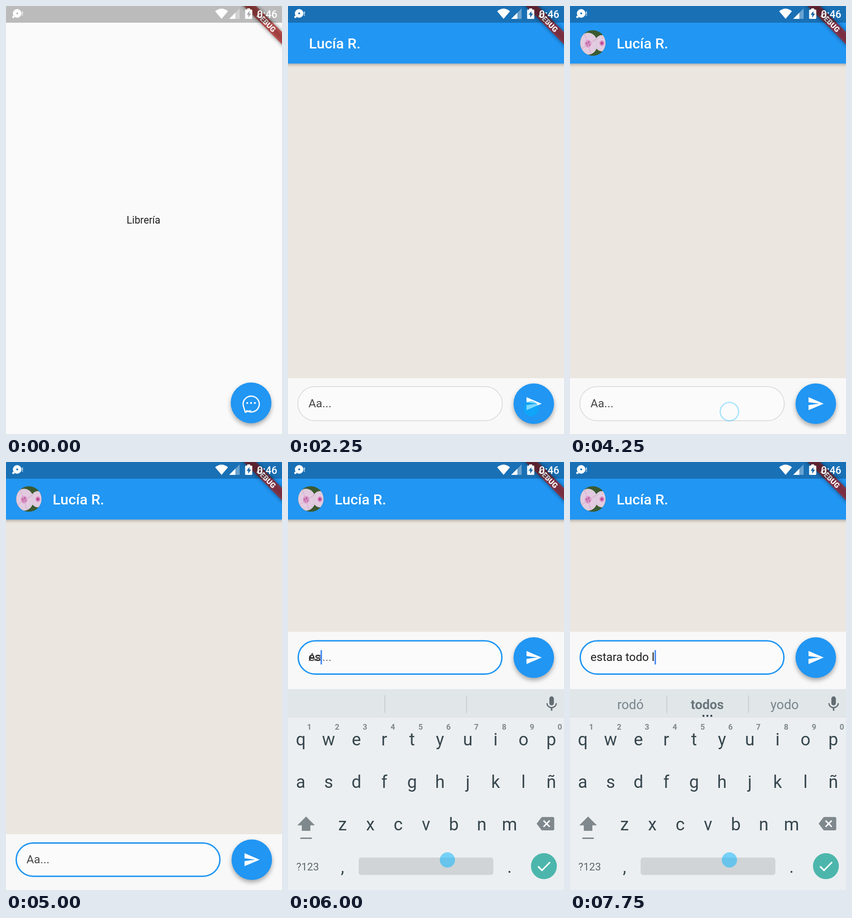
Write an HTML page that moves like this. It is 580x897 px and loops after 8 s.

```html
<!DOCTYPE html>
<html lang="es">
<head>
<meta charset="utf-8">
<title>Chat</title>
<style>
  html, body { margin: 0; width: 100%; height: 100%; overflow: hidden; background: #fafafa; }
  svg { display: block; width: 580px; height: 897px; }
  text { font-family: Roboto, sans-serif; white-space: pre; }
  .mid { text-anchor: middle; }
  .fab { fill: #2196f3; filter: drop-shadow(0 5px 5px rgba(0, 0, 0, .32)); }
  .bar { fill: #2196f3; filter: drop-shadow(0 2px 3px rgba(0, 0, 0, .32)); }
  .title { font-size: 30.4px; font-weight: 500; fill: #fff; }
  .field { font-size: 24.3px; fill: #212121; }
  .hint { fill: #484848; }
  .key { font-size: 36.5px; fill: #37474f; text-anchor: middle; }
  .digit { font-size: 16.5px; font-weight: 700; fill: #7f898e; text-anchor: middle; }
  .word { font-size: 27.4px; fill: #78858b; text-anchor: middle; }
  .best { font-weight: 700; fill: #6b787e; }
  .band { fill: #b71c1c; fill-opacity: .63; }
  .tag { font-size: 15.5px; font-weight: 900; fill: #fff; text-anchor: middle; }
  .clock { font-size: 21.6px; font-weight: 500; fill: #fff; }
</style>
</head>
<body>
<svg viewBox="0 0 580 897">
  <defs>
    <clipPath id="face"><circle cx="48" cy="77.5" r="26.7"/></clipPath>
    <radialGradient id="petal">
      <stop offset="0" stop-color="#a81c78"/>
      <stop offset=".16" stop-color="#c763a6"/>
      <stop offset=".4" stop-color="#e6cbe2"/>
      <stop offset="1" stop-color="#dccbdc"/>
    </radialGradient>
    <filter id="soft" x="-30%" y="-100%" width="160%" height="300%"><feGaussianBlur stdDeviation="4"/></filter>
  </defs>

  <rect width="580" height="897" fill="#fafafa"/>

  <g id="home">
    <text class="mid" x="289" y="456" font-size="21.25" fill="#212121">Librería</text>
    <circle class="fab" cx="515" cy="831.7" r="42.8"/>
    <path d="M505 847.5A17 16.6 0 1 0 498.6 837.5Q500.5 844 503 851.5Q510 848 515 848.6" fill="none" stroke="#fff" stroke-width="2.6" stroke-linejoin="round"/>
    <g fill="#fff">
      <circle cx="507" cy="832" r="2.1"/><circle cx="515" cy="832" r="2.1"/><circle cx="523" cy="832" r="2.1"/>
    </g>
  </g>

  <g id="chat">
    <rect id="wall" width="580" height="780" fill="#ebe6e0"/>
    <rect class="bar" x="-10" y="-10" width="600" height="130.5"/>
    <g id="avatar" clip-path="url(#face)">
      <rect x="20" y="50" width="56" height="56" fill="#3c5a30"/>
      <ellipse cx="67" cy="78" rx="15" ry="17" fill="url(#petal)"/>
      <ellipse cx="38" cy="79" rx="20" ry="23" fill="url(#petal)"/>
      <path d="M38 80L30 58M38 80L56 69M38 80L24 90M38 80L44 101" stroke="#d9aed2" stroke-width="1.5"/>
    </g>
    <text id="name" class="title" y="89">Lucía R.</text>

    <g id="dock">
      <rect y="780" width="580" height="120" fill="#f8f8f8"/>
      <rect id="box" rx="36" fill="#fbfbfb"/>
      <text id="hint" class="field hint" x="43" y="840.5">Aa...</text>
      <text id="typed" class="field" x="43" y="840.5"></text>
      <rect id="caret" y="818" width="3" height="30" fill="#4285f4"/>
      <circle class="fab" cx="516.5" cy="833.5" r="42.6"/>
      <path transform="translate(498.2 815.2) scale(1.518)" d="M2.01 21L23 12 2.01 3 2 10l15 2-15 2z" fill="#fff"/>
    </g>

    <g id="keyboard">
      <rect y="476" width="580" height="421" fill="#eceff1"/>
      <rect y="476" width="580" height="60" fill="#e1e6e9"/>
      <path d="M203.5 489v37M375 489v37" stroke="#c4c9cc" stroke-width="1.5"/>
      <path transform="translate(535 488) scale(1.58)" fill="#616c72" d="M12 14c1.66 0 3-1.34 3-3V5c0-1.66-1.34-3-3-3S9 3.34 9 5v6c0 1.66 1.34 3 3 3zm5.3-3c0 3-2.54 5.1-5.3 5.1S6.7 14 6.7 11H5c0 3.41 2.72 6.23 6 6.72V21h2v-3.28c3.28-.48 6-3.3 6-6.72z"/>
      <text class="word" x="127" y="518"></text>
      <text class="word best" x="288.5" y="518"></text>
      <text class="word" x="451" y="518"></text>
      <g id="more" fill="#37474f">
        <circle cx="280.5" cy="532" r="2.2"/><circle cx="288.7" cy="532" r="2.2"/><circle cx="297" cy="532" r="2.2"/>
      </g>
      <g id="keys"></g>
      <g fill="#7f898d">
        <path d="M38 743L56.5 761.5H47V773H29V761.5H19.5Z"/>
        <rect x="26" y="787" width="24" height="3"/>
        <path d="M522.5 758L532 745.5Q533 744 535 744H556.5Q559.5 744 559.5 747V769Q559.5 772 556.5 772H535Q533 772 532 770.5Z"/>
      </g>
      <path d="M537 751.5l13 13m0-13l-13 13" stroke="#fff" stroke-width="3"/>
      <text x="17.5" y="856" font-size="22" fill="#5c696f">?123</text>
      <text class="key" x="114.5" y="861">,</text>
      <text class="key" x="465.5" y="861">.</text>
      <rect x="148.5" y="829" width="283" height="36.5" rx="5" fill="#d0d4d6"/>
      <circle cx="537.8" cy="847" r="27.2" fill="#4db6ac"/>
      <path d="M525.5 847.5l8.3 8.3 17-17.3" fill="none" stroke="#fff" stroke-width="3.2"/>
    </g>
  </g>

  <g transform="translate(585.5 0) rotate(45)">
    <rect x="-70" y="42.5" width="140" height="18.3" opacity=".5" filter="url(#soft)"/>
    <rect class="band" x="-70" y="42.5" width="140" height="18.3"/>
    <text class="tag" x="-3" y="57.2">DEBUG</text>
  </g>

  <rect width="580" height="35" fill="#000" fill-opacity=".255"/>
  <g fill="#fff">
    <path d="M23.5 6.5a9 9 0 1 1-.1 0zm0 7a2 2 0 1 0 .1 0z" fill-rule="evenodd"/>
    <circle cx="15.5" cy="23" r="2.4"/>
    <path d="M33.5 11.5h2v6h-2zM33.5 18.5h2v2h-2z" opacity=".8"/>
    <path d="M439.5 11Q453 0 466.5 11L453 27Z"/>
    <path d="M469 27L491 5V27Z" opacity=".35"/>
    <path d="M469 27L482 14V27Z"/>
    <path fill-rule="evenodd" d="M507 5h6v2.5h3q1.5 0 1.5 1.5v16.500q0 1.500-1.500 1.500h-12q-1.500 0-1.500-1.500v-16.500q0-1.500 1.500-1.500h3zM511.500 10.500L505.500 18.500H509V24.500L515 16H511.500Z"/>
    <text class="clock" x="527.5" y="24.500">0:46</text>
  </g>

  <circle id="dot" r="16" fill="#00b4ff" fill-opacity=".5"/>
  <circle id="ring" fill="none" stroke="#00b4ff" stroke-width="2.6"/>
</svg>
<script>
  const LOOP = 8000;
  const $ = id => document.getElementById(id);
  const words = document.querySelectorAll('.word');

  const rows = [
    ['qwertyuiop', 26.8, 594],
    ['asdfghjklñ', 26.8, 683],
    ['zxcvbnm', 114.5, 772]
  ];
  const label = (cls, x, y, s) => `<text class="${cls}" x="${x}" y="${y}">${s}</text>`;
  $('keys').innerHTML = rows.map(([letters, x0, y], row) =>
    [...letters].map((c, i) => {
      const x = x0 + i * 58.5;
      return label('key', x, y, c) + (row ? '' : label('digit', x + 18, 561, (i + 1) % 10));
    }).join('')).join('');

  const start = {
    chat: false, avatar: false, raised: false, focus: 0, keys: 0,
    dot: null, ring: null, text: '', hint: 1, caret: false, words: ['', '', ''], more: false
  };

  // Each step changes part of the state; ring is [x, y, radius, opacity].
  const steps = [
    [500, { dot: [499, 878] }],
    [750, { dot: [511, 844] }],
    [1500, { dot: null, ring: [511, 860.5, 19.3, .35] }],
    [1750, { ring: [511, 861, 20.5, .15] }],
    [2000, { ring: null }],
    [2250, { chat: true, dot: [511, 844] }],
    [3000, { dot: [491, 849] }],
    [3250, { avatar: true, dot: [361, 845] }],
    [3500, { dot: [335, 834] }],
    [4250, { dot: null, ring: [335, 850, 19.3, .35] }],
    [4500, { ring: [335, 850.5, 20, .2] }],
    [4750, { ring: [335, 851, 20.6, .1], focus: .5 }],
    [5000, { ring: null, focus: 1 }],
    [5500, { raised: true, dot: [335, 834] }],
    [5750, { keys: .6 }],
    [6000, { keys: 1, text: 'es', hint: .8, caret: true }],
    [6250, { text: 'esta', hint: 0 }],
    [6500, { text: 'estara ', words: ['estaba', 'estará', 'estaré'] }],
    [6750, { words: ['estará', 'estara', 'estaré'], more: true }],
    [7000, { caret: false }],
    [7250, { text: 'estara to', caret: true }],
    [7500, { text: 'estara todo', words: ['todos', 'todo', 'toda'] }],
    [7750, { text: 'estara todo l', words: ['rodó', 'todos', 'yodo'] }]
  ];

  const set = (el, attrs) => { for (const k in attrs) el.setAttribute(k, attrs[k]); };
  const show = (el, on) => set(el, { visibility: on ? 'inherit' : 'hidden' });

  function drawBox(focus) {
    const w = 1.3 + 1.7 * focus;
    set($('box'), {
      x: 20 + w / 2, y: 797 + w / 2, width: 431 - w, height: 72.7 - w,
      'stroke-width': w, stroke: focus === 1 ? '#2196f3' : focus ? '#7ab3e3' : '#d0d0d0'
    });
  }

  function draw(s) {
    show($('home'), !s.chat);
    show($('chat'), s.chat);
    show($('avatar'), s.avatar);
    set($('name'), { x: s.avatar ? 98 : 44 });

    const lift = s.raised ? -423.7 : 0;
    set($('dock'), { transform: `translate(0 ${lift})` });
    set($('wall'), { height: 780 + lift });
    drawBox(s.focus);

    $('typed').textContent = s.text;
    set($('hint'), { opacity: s.hint });
    show($('caret'), s.caret);
    set($('caret'), { x: 43 + (s.text ? $('typed').getComputedTextLength() : 0) });

    set($('keyboard'), { opacity: s.keys });
    words.forEach((el, i) => { el.textContent = s.words[i]; });
    show($('more'), s.more);

    show($('dot'), s.dot);
    if (s.dot) set($('dot'), { cx: s.dot[0], cy: s.dot[1] });
    show($('ring'), s.ring);
    if (s.ring) {
      const [cx, cy, r, opacity] = s.ring;
      set($('ring'), { cx, cy, r, opacity });
    }
  }

  const t0 = performance.now();
  let last = -1;
  function tick() {
    const t = (performance.now() - t0) % LOOP;
    const past = steps.filter(([at]) => at <= t);
    if (past.length !== last) {
      last = past.length;
      draw(Object.assign({}, start, ...past.map(([, change]) => change)));
    }
    requestAnimationFrame(tick);
  }
  tick();
</script>
</body>
</html>
```
